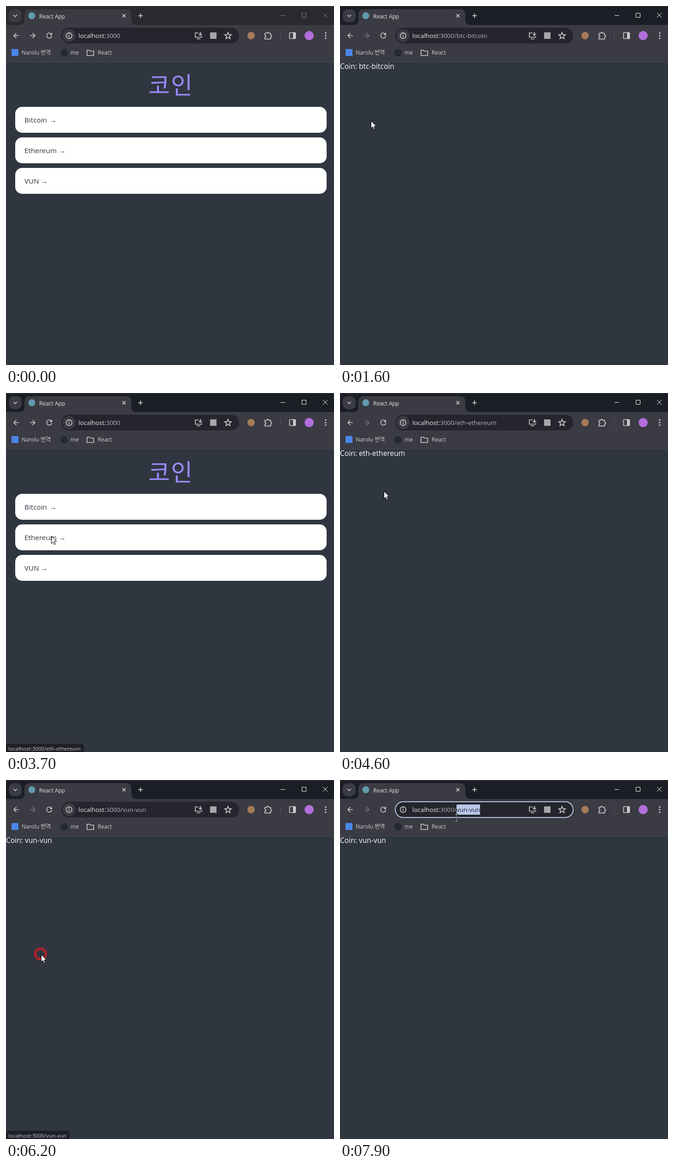
An HTML page for the animation above (8000 ms loop, 712x776 px).

```html
<!DOCTYPE html>
<html lang="ko">
<head>
<meta charset="utf-8">
<title>React App</title>
<style>
  html, body { margin: 0; width: 100%; height: 100%; overflow: hidden; background: #2f3640; }
  body, text { font-family: "Open Sans", "Noto Sans CJK KR", "Noto Sans", sans-serif; }
  svg { position: absolute; left: 0; top: 0; }
  .icon { fill: none; stroke: #c9cacf; stroke-width: 1.7; }
  .ui { font-size: 12px; fill: #d0d1d6; }
  .card { font-size: 15.3px; fill: #2f3640; }
  .arrow { font-family: "Liberation Sans", sans-serif; }
  #url, #status { position: absolute; white-space: pre; }
  #url { left: 157px; top: 53px; font-size: 13.5px; line-height: 22px; color: #b4b5bb; }
  #url b { font-weight: 400; color: #eeeef2; }
  #url mark { display: inline-block; background: #b9c7e8; color: #22242c; }
  #status { left: 0; top: 758px; height: 18px; padding: 0 7px 0 5px; border-radius: 0 4px 0 0;
    background: #1f2027; color: #c6c7cc; font-size: 11.6px; line-height: 21px; overflow: hidden; }
</style>
</head>
<body>
<svg width="712" height="776" viewBox="0 0 712 776">
  <!-- window frame and tab -->
  <rect id="bar" width="712" height="42"/>
  <path d="M0 .5H712" stroke="#3b3d43"/>
  <rect x="6" y="7" width="28" height="28" rx="10" fill="#3a3b43"/>
  <path class="icon" d="M16 19l4 4 4-4" stroke="#eee"/>
  <path d="M30 41a10 10 0 0 0 10-10V17a10 10 0 0 1 10-10H262a10 10 0 0 1 10 10V31a10 10 0 0 0 10 10z" fill="#3a3b43"/>
  <circle cx="56" cy="21" r="7.5" fill="#639aad"/>
  <text class="ui" x="72" y="27" style="fill:#e6e6ea">React App</text>
  <path class="icon" d="M252.5 17.5l7 7m0-7l-7 7M287 21h10m-5-5v10" style="stroke:#dcdce0;stroke-width:1.5"/>
  <path id="controls" d="M596 20.5h10M642.5 15.5h9v9h-9zM688 15l10 10m0-10l-10 10" fill="none"/>

  <!-- toolbar -->
  <rect y="41" width="712" height="81" fill="#3a3b43"/>
  <path d="M0 121.5H712" stroke="#454a52"/>
  <circle id="press" cx="22" cy="64" r="17" fill="#62656a"/>
  <path class="icon" d="M28 64H17m5.5-5.5L17 64l5.5 5.5"/>
  <path class="icon" id="forward" d="M52 64h11m-5.500-5.500L63 64l-5.500 5.500"/>
  <path class="icon" d="M98.500 60.500a5.600 5.600 0 1 0 1 4.500"/>
  <path d="M100 57.500v5.500h-5.500z" fill="#c9cacf"/>
  <rect id="box" x="120" y="47" width="386" height="34" rx="17" fill="#24252d" stroke="#b9c4e6"/>
  <circle id="chip" cx="137" cy="64" r="14" fill="#3a3b43"/>
  <circle class="icon" cx="137" cy="64" r="6.200" stroke="#e0e0e4"/>
  <path class="icon" d="M137 63v4.200m0-7.200v1.700"/>
  <path class="icon" d="M418 58h-7v9.500h14V65M414 71h8M422 56v7m-3.500-3l3.500 3.500 3.500-3.500"/>
  <rect x="443" y="57" width="14" height="14" fill="#a6a7ac"/>
  <path class="icon" id="star"/>
  <circle cx="532" cy="64" r="8" fill="#a77a58"/>
  <path class="icon" d="M562 59h4a2.200 2.200 0 0 1 4.400 0h4v4a2.200 2.200 0 0 1 0 4.400v4h-12.400v-4a2.200 2.200 0 0 0 0-4.400z"/>
  <path d="M595.500 56v16" stroke="#5b5c64"/>
  <rect class="icon" x="615.500" y="57.500" width="13" height="13" rx="1"/>
  <rect x="623" y="57" width="6" height="14" fill="#c9cacf"/>
  <circle cx="658" cy="64" r="10" fill="#b36edb"/>
  <path d="M694 58.500v.01m0 5.490v.01m0 5.490v.01" stroke="#d0d1d6" stroke-width="3.400" stroke-linecap="round"/>

  <!-- bookmarks -->
  <rect x="12" y="93" width="15" height="15" fill="#4a86e8"/>
  <text class="ui" x="34" y="105">Narolu 번역</text>
  <circle cx="126" cy="101" r="8" fill="#24292f"/>
  <text class="ui" x="140" y="105">me</text>
  <path class="icon" d="M175.800 95.500h5l2 2h7.500v9.500h-14.500z"/>
  <text class="ui" x="199" y="105">React</text>

  <!-- page -->
  <g id="home">
    <text x="309" y="190" font-size="51" letter-spacing="2" fill="#9c88ff" style="font-family:'Noto Sans CJK KR',sans-serif">코인</text>
  </g>
  <text id="coin" y="136" font-size="15.600" fill="#fff"></text>
</svg>
<div id="url"><b>localhost:</b>3000<span id="path"></span><mark id="picked"></mark></div>
<div id="status"></div>
<svg width="712" height="776" viewBox="0 0 712 776">
  <circle id="ring" fill="none" stroke="#e01b20"/>
  <path id="pointer" d="M.500 .500V16.500l3.700-3.500 2.600 5.700 2.500-1.100-2.500-5.600h5z" fill="#fff" stroke="#000"/>
  <g id="beam" fill="none">
    <path d="M-3.500-7.500h3l.5.500.5-.500h3M0-7V7M-3.500 7.500h3l.5-.500.5.500h3" stroke="#222" stroke-width="2.400"/>
    <path d="M-3.500-7.500h3l.5.500.5-.500h3M0-7V7M-3.500 7.500h3l.5-.500.5.500h3" stroke="#c4c5c9"/>
  </g>
</svg>
<script>
const $ = id => document.getElementById(id);
const show = (id, on) => { $(id).style.display = on ? '' : 'none'; };
const clamp = v => Math.max(0, Math.min(1, v));

const LOOP = 8000, STEP = 100;
const FOCUS = 7100;
// enter: link hovered, click: page opens, leave: status bubble closes, back: home returns
const visits = [
  { name: 'Bitcoin', id: 'btc-bitcoin', arrowX: 94.5, enter: 700, click: 1000, leave: 1500, back: 2700 },
  { name: 'Ethereum', id: 'eth-ethereum', arrowX: 114.5, enter: 3700, click: 4000, leave: 4500, back: 5200 },
  { name: 'VUN', id: 'vun-vun', arrowX: 75.5, enter: 5900, click: 6100, leave: 6600, back: LOOP }
];
// time, x, y of the mouse
const track = [
  [200, 430, 420], [700, 84, 252], [1000, 67, 248], [1700, 67, 248], [2500, 28, 66], [2900, 28, 66],
  [3500, 92, 300], [3800, 100, 312], [4200, 100, 312], [4600, 95, 212], [5100, 21, 62], [5300, 21, 62],
  [5600, 68, 236], [6000, 76, 377], [6500, 76, 377], [7000, 306, 66], [7200, 306, 66], [7800, 253, 82]
];
const clicks = [1000, 2700, 4000, 5200, 6100, FOCUS];

function mouse(t) {
  const next = track.findIndex(p => p[0] > t);
  if (next < 0) return track[track.length - 1].slice(1);
  if (!next) return track[0].slice(1);
  const [t0, x0, y0] = track[next - 1], [t1, x1, y1] = track[next];
  const k = (t - t0) / (t1 - t0), e = k * k * (3 - 2 * k);
  return [x0 + (x1 - x0) * e, y0 + (y1 - y0) * e];
}

const starPoints = Array.from({ length: 10 }, (_, i) => {
  const r = i % 2 ? 3.2 : 7.6, a = (i / 5 - 0.5) * Math.PI;
  return (482 + r * Math.cos(a)).toFixed(1) + ' ' + (64.5 + r * Math.sin(a)).toFixed(1);
});
$('star').setAttribute('d', 'M' + starPoints.join('L') + 'z');

$('home').insertAdjacentHTML('beforeend', visits.map((v, i) => {
  const y = 218 + 66 * i;
  return `<rect x="20" y="${y}" width="676" height="56" rx="15" fill="#fff"/>
    <text class="card" x="40" y="${y + 34}">${v.name} <tspan class="arrow" x="${v.arrowX}">→</tspan></text>`;
}).join(''));
const links = document.querySelectorAll('.card');

function drawRing(t, click) {
  show('ring', click !== undefined);
  if (click === undefined) return;
  const age = (t - click) / 100, [x, y] = mouse(click), ring = $('ring');
  const look = { cx: x - 1, cy: y - 1, r: 8 + 3.5 * age, 'stroke-width': 6 - 0.9 * age, opacity: 0.9 - 0.17 * age };
  for (const key in look) ring.setAttribute(key, look[key]);
}

function draw(t) {
  const open = visits.find(v => t >= v.click && t < v.back);
  const hint = visits.find(v => t >= v.enter && t < v.leave);
  const active = t >= 900, focus = t >= FOCUS;

  $('bar').setAttribute('fill', active ? '#1c1e26' : '#292a2e');
  $('controls').setAttribute('stroke', active ? '#fff' : '#818286');
  $('forward').style.stroke = open ? '#74757c' : '';
  show('press', (t >= 2400 && t < 3000) || (t >= 5000 && t < 5700));
  $('box').setAttribute('stroke-width', focus ? 2 : 0);
  show('chip', !focus);

  const path = open ? '/' + open.id : '';
  const count = open ? Math.round(clamp((t - 7200) / 600) * open.id.length) : 0;
  $('path').textContent = path.slice(0, path.length - count);
  $('picked').textContent = path.slice(path.length - count);

  show('home', !open);
  $('coin').textContent = open ? 'Coin: ' + open.id : '';
  show('status', hint);
  $('status').textContent = hint ? 'localhost:3000/' + hint.id : '';
  visits.forEach((v, i) => {
    const mix = t < v.click ? clamp((t - v.enter) / 200) * 100 : 0;
    links[i].style.fill = `color-mix(in srgb, #9c88ff ${mix}%, #2f3640)`;
  });

  drawRing(t, clicks.find(c => t >= c && t < c + 550));
  const [x, y] = mouse(t);
  const typing = t >= 7000;
  show('pointer', t >= 200 && !typing);
  show('beam', typing);
  $(typing ? 'beam' : 'pointer').setAttribute('transform', `translate(${Math.round(x)} ${Math.round(y)})`);
}

const start = performance.now();
function frame() {
  const t = (performance.now() - start) % LOOP;
  draw(Math.floor(t / STEP) * STEP);
  requestAnimationFrame(frame);
}
frame();
</script>
</body>
</html>
```
